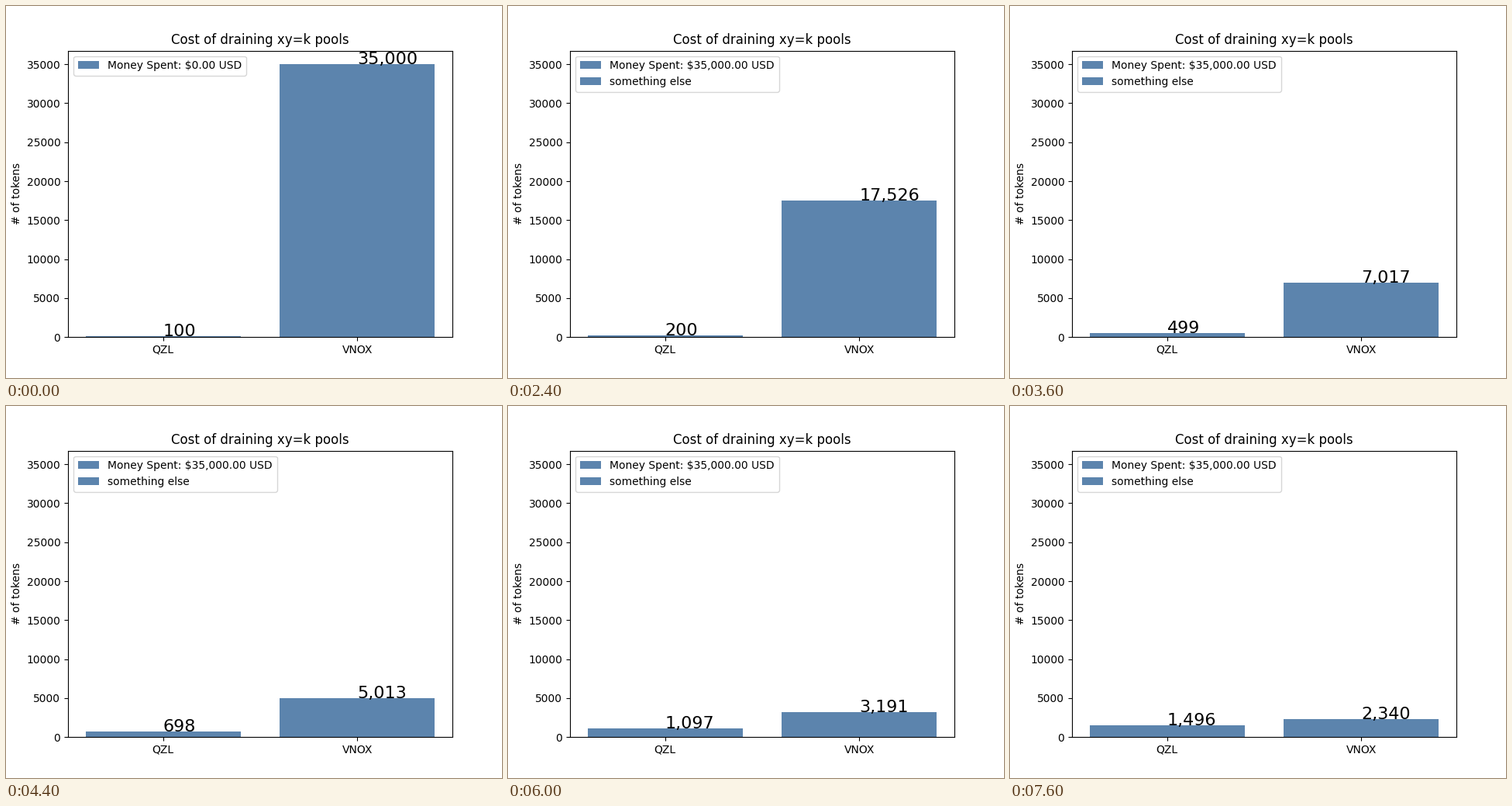
Write a matplotlib script that moves like this. It is 640x480 px and loops after 8 s.

```python
import matplotlib.pyplot as plt
from matplotlib.animation import FuncAnimation

FRAMES, INTERVAL = 40, 200
START_A, START_B = 100, 35000
TRADE = 100          # tokens paid in per swap
FEE = 0.003
BLUE = (0.2, 0.4, 0.6, 0.8)

plt.rcParams["font.family"] = "DejaVu Sans"
fig, ax = plt.subplots(figsize=(6.4, 4.8), dpi=100)
bars = ax.bar(["QZL", "VNOX"], [START_A, START_B], color=BLUE)
ax.set_xlim(-0.49, 1.49)
ax.set_ylim(0, START_B * 1.05)
ax.set_title("Cost of draining xy=k pools")
ax.set_ylabel("# of tokens")
counts = [ax.text(x, 0, "", fontsize=16, color="black") for x in (0, 1)]


def pool(swaps):
    """Reserves on the constant-product curve after some swaps."""
    a = START_A + swaps * TRADE * (1 - FEE)
    return a, START_A * START_B / a


def update(frame):
    swaps = max(0, (frame - 10) // 2)
    for bar, count, value in zip(bars, counts, pool(swaps)):
        bar.set_height(value)
        count.set_y(value)
        count.set_text(f"{value:,.0f}")

    spent = 35000 if swaps else 0
    labels = [f"Money Spent: ${spent:,.2f} USD", "something else"]
    shown = 1 if frame == 0 else 2
    ax.legend(bars.patches[:shown], labels[:shown], loc="upper left")
    return []


anim = FuncAnimation(fig, update, frames=FRAMES, interval=INTERVAL,
                     init_func=lambda: update(0), repeat=True,
                     repeat_delay=0, blit=False)
plt.show()
```
